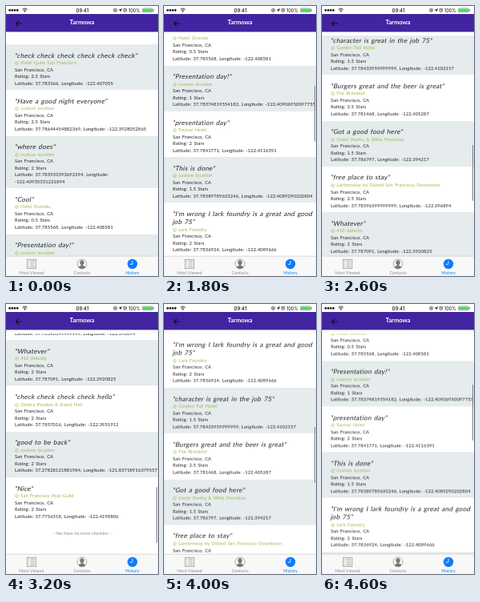
An HTML page for the animation above (4.7 s loop, 190x338 px).

```html
<!DOCTYPE html>
<html lang="en">
<head>
<meta charset="utf-8">
<title>Check-in history</title>
<style>
  html, body { margin: 0; width: 100%; height: 100%; overflow: hidden; background: #fff; }
  #stage { position: relative; width: 190px; height: 338px; overflow: hidden; background: #fff; font-family: Lato, sans-serif; color: #222; }
  #bars { position: absolute; inset: 0; }
  #view { position: absolute; top: 37px; left: 0; width: 190px; height: 276px; overflow: hidden; }
  #list { padding-top: 11px; will-change: transform; }
  .row { padding: 8.6px 0 4.15px 11px; white-space: nowrap; font-size: 5.8px; line-height: 8.5px; letter-spacing: .09px; word-spacing: .7px; }
  .row:nth-child(odd) { background: #e6ebed; }
  .title { font-size: 8.1px; line-height: 10.3px; letter-spacing: .28px; word-spacing: .7px; margin-bottom: .25px; }
  .title span { display: block; transform: skewX(-12deg); }
  .place { color: #8fbf40; }
  .end { margin-top: 9px; text-align: center; font-size: 5.5px; line-height: 8.5px; color: #8b8b8b; }
  #thumb { position: absolute; right: 1.2px; top: 8px; width: 1.3px; height: 70px; border-radius: 1px; background: #7f8183; }
</style>
</head>
<body>
<div id="stage">
  <div id="view"><div id="list"></div><div id="thumb"></div></div>
  <svg id="bars" width="190" height="338" viewBox="0 0 190 338" font-family="Lato, sans-serif">
    <rect y="10" width="190" height="22.4" fill="#4224a1"/>
    <text x="95" y="22.6" font-size="7.6" font-weight="700" fill="#fff" text-anchor="middle">Tarmowa</text>
    <path d="M20 22H12.5M15.8 18.6L12.4 22L15.8 25.4" fill="none" stroke="#111" stroke-width="1.1"/>

    <g fill="#111">
      <path d="M4.6 5.3H17.4" stroke="#111" stroke-width="2.8" stroke-linecap="round" stroke-dasharray="0 3.2"/>
      <path d="M20.6 4.3Q23.6 1.5 26.6 4.3M21.9 5.7Q23.6 4.2 25.3 5.7" fill="none" stroke="#111" stroke-width=".9"/>
      <circle cx="23.6" cy="7" r=".8"/>
      <text x="95.5" y="7.5" font-family="Inter, sans-serif" font-size="6.1" font-weight="500" text-anchor="middle">09:41</text>
      <circle cx="136.5" cy="5.3" r="2.1" fill="none" stroke="#111" stroke-width=".6"/>
      <rect x="135.7" y="4.7" width="1.6" height="1.4"/>
      <path d="M145 3L140.4 5.2L142.7 5.5L143 7.7Z"/>
      <circle cx="148.7" cy="5.4" r="1.9" fill="none" stroke="#111" stroke-width=".7"/>
      <path d="M148.7 4.2V5.5H149.7M146.5 3.6L147.5 2.7M150.9 3.6L149.9 2.7" fill="none" stroke="#111" stroke-width=".5"/>
      <text x="153" y="7.5" font-family="Inter, sans-serif" font-size="5.6">100%</text>
    </g>
    <rect x="170.5" y="2.9" width="13" height="4.9" rx=".9" fill="#fff" stroke="#333" stroke-width=".4"/>
    <rect x="171.1" y="3.5" width="11.8" height="3.7" rx=".5" fill="#4cd964"/>
    <path d="M184.6 4.5V6.2" stroke="#333" stroke-width=".8"/>

    <rect y="313" width="190" height="25" fill="#f8f8f8"/>
    <path d="M0 313.2H190" stroke="#b8b8b8" stroke-width=".5"/>
    <g fill="none" stroke="#8c8c8c" stroke-width=".7">
      <rect x="26.3" y="317.3" width="11.4" height="11.4"/>
      <path d="M30.3 319.4H36.2M30.3 321.8H36.2M30.3 324.2H36.2M30.3 326.6H36.2"/>
      <path d="M27.8 319.4H29M27.8 321.8H29M27.8 324.2H29M27.8 326.6H29"/>
      <circle cx="95" cy="323" r="6"/>
    </g>
    <g fill="#777">
      <ellipse cx="95" cy="321.2" rx="2.6" ry="3"/>
      <path d="M90.5 326.9Q91 325.5 94 324.8V323H96V324.8Q99 325.5 99.5 326.9A6 6 0 0 1 90.5 326.9Z"/>
    </g>
    <circle cx="158" cy="323" r="6.2" fill="#087cff"/>
    <path d="M158 318.8V323.3H154.8" fill="none" stroke="#fff" stroke-width=".8"/>
    <g font-size="5.4" text-anchor="middle" fill="#8c8c8c">
      <text x="32" y="335.6">Most Viewed</text>
      <text x="95" y="335.6">Contacts</text>
      <text x="158" y="335.6" fill="#087cff">History</text>
    </g>
  </svg>
</div>
<script>
  // title (lines split by /) | place | stars | latitude | longitude
  const checkins = `check check check check check check|Hotel Quilo San Francisco|2.5|37.783366|-122.407055
Have a good night everyone|custom location|2.5|37.78644454882369|-122.3928052865
where does|custom location|2|37.783933393692394|<br>-122.40935331221894
Cool|Hotel Ovandu|0.5|37.785568|-122.408581
Presentation day!|custom location|1|37.78374819554182|-122.40906950097755
presentation day|Tavisor Hotel|2|37.7841771|-122.4116391
This is done|custom location|1.5|37.78389789633246|-122.4089290202804
I'm wrong I lark foundry is a great and good/job 75|Lark Foundry|2|37.7836924|-122.4089666
character is great in the job 75|Gordon Tull Hotel|1.5|37.78433959999999|-122.4102157
Burgers great and the beer is great|The Bramblet|2.5|37.781468|-122.405287
Got a good food here|Cedar Pantry &amp; Wine Provision|1.5|37.786797|-122.394217
free place to stay|Lanternway by Ostrell San Francisco Downtown|2.5|37.78596599999999|-122.396894
Whatever|418 Alderby|2|37.787091|-122.3920825
check check check check hello|Ombra Pavilion &amp; Event Hall|2|37.7857016|-122.3931911
good to be back|custom location|2|37.27828121881984|-121.83718916379557
Nice|San Francisco Pear Guild|2|37.7756318|-122.4198806`;

  const list = document.getElementById('list');
  const thumb = document.getElementById('thumb');

  list.innerHTML = checkins.split('\n').map(line => {
    const [title, place, stars, lat, lon] = line.split('|');
    const lines = `"${title}"`.split('/').map(s => `<span>${s}</span>`).join('');
    return `<div class="row"><div class="title">${lines}</div>
      <div class="place">@ ${place}</div>San Francisco, CA<br>Rating: ${stars} Stars<br>Latitude: ${lat}, Longitude: ${lon}</div>`;
  }).join('') + '<div class="end">- You have no more checkins -</div>';

  const LOOP = 4700, STEP = 100, BOTTOM = 709, THUMB_TRAVEL = 184;
  const glide = ms => 1 - Math.exp(-ms / 500);

  // Two flicks down to the end, a small bounce, one flick back up
  function scrollAt(t) {
    if (t < 1400) return 0;
    if (t < 1700) return 132 * ((t - 1400) / 300) ** 2;
    if (t < 2700) return 132 + 436 * glide(t - 1700);
    if (t < 3000) return 509 + 200 * ((t - 2700) / 300) ** 1.4;
    if (t < 3200) return BOTTOM + 8 * Math.sin(Math.PI * (t - 3000) / 200);
    if (t < 3500) return BOTTOM;
    if (t < 3800) return BOTTOM - 144 * ((t - 3500) / 300) ** 2;
    return 565 - 439 * glide(t - 3800);
  }

  function draw() {
    const t = Math.floor(performance.now() % LOOP / STEP) * STEP;
    const y = scrollAt(t);
    list.style.transform = `translateY(${-y}px)`;
    thumb.style.transform = `translateY(${Math.min(y / BOTTOM, 1) * THUMB_TRAVEL}px)`;
    thumb.style.opacity = t > 1400 ? 1 : 0;
    requestAnimationFrame(draw);
  }
  draw();
</script>
</body>
</html>
```
